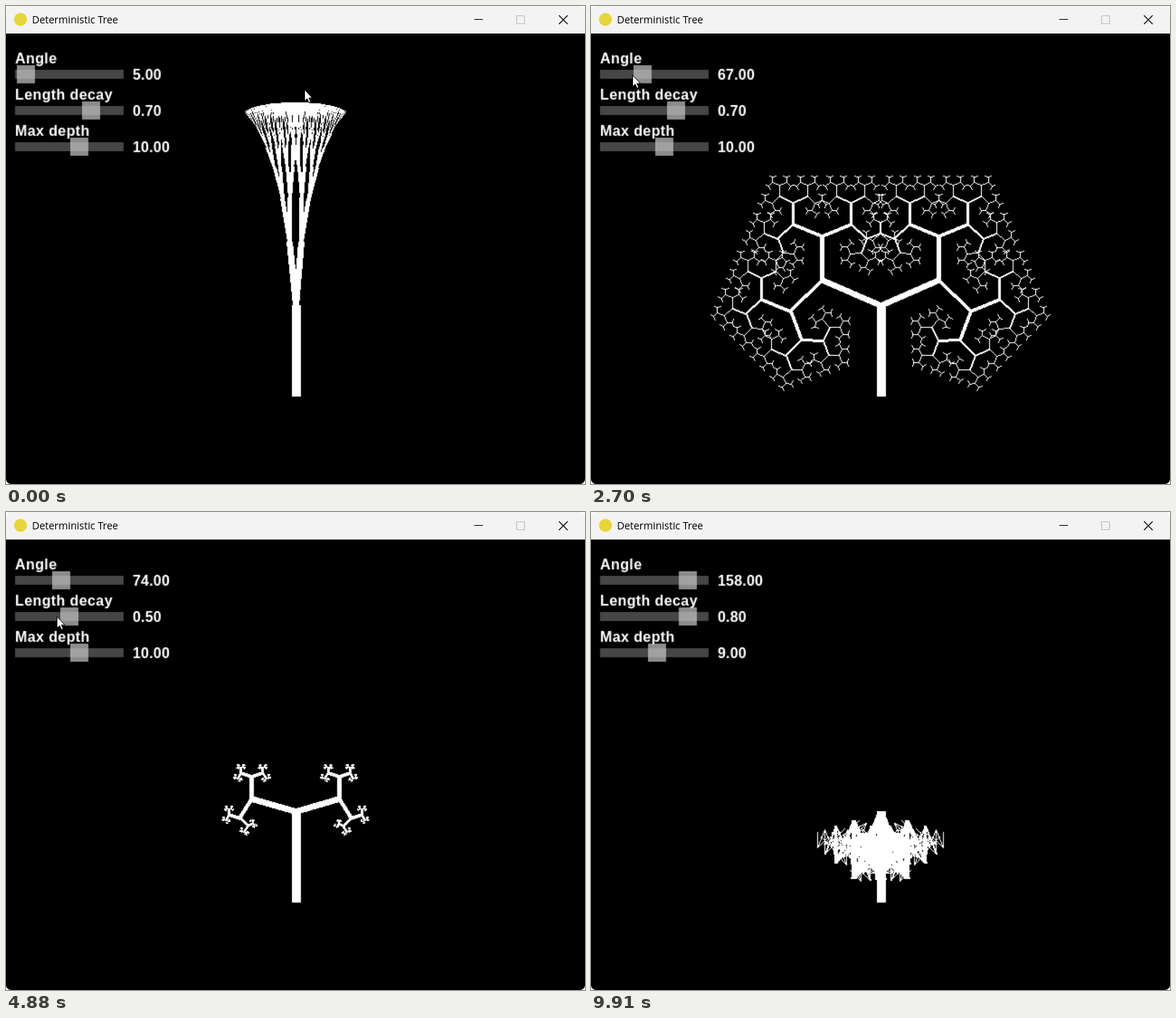
Recreate the animation shown at these times as an HTML page with a canvas. Size 800 px wide and 660 px high, loop 10 s.

```html
<!DOCTYPE html>
<html lang="en">
<head>
<meta charset="utf-8">
<title>Deterministic Tree</title>
<style>
  html, body { margin: 0; width: 800px; height: 660px; overflow: hidden; background: #fff; }
  canvas { display: block; }
</style>
</head>
<body>
<canvas id="stage" width="800" height="660"></canvas>
<script>
const LOOP = 10000, BAR = 38, SCALE = 1.25, W = 640, H = 498;
const ctx = document.getElementById('stage').getContext('2d');

// The game surface is small and shown enlarged.
const game = document.createElement('canvas');
game.width = W;
game.height = H;
const g = game.getContext('2d', { willReadFrequently: true });
const image = g.createImageData(W, H);
const pixels = new Uint32Array(image.data.buffer);

const angle = { label: 'Angle', row: 0, min: 0, max: 180, step: 1, initial: 5 };
const decay = { label: 'Length decay', row: 1, min: .1, max: .9, step: .1, initial: .7 };
const depth = { label: 'Max depth', row: 2, min: 2, max: 15, step: 1, initial: 10 };
const sliders = [angle, decay, depth];

// The hand's stops: [time, slider, value]. Between two stops on one slider
// it drags the knob, otherwise it glides across without touching anything.
const stops = [
  [1580, angle, 36], [2030, angle, 47], [2620, angle, 75], [3180, angle, 23], [3450, angle, 0], [3700, angle, 74],
  [3950, decay, .7], [4200, decay, .9], [4400, decay, .9], [5000, decay, .4],
  [5500, depth, 10], [5850, depth, 14], [6240, depth, 11], [6950, depth, 2],
  [7440, decay, .4], [7680, decay, .8],
  [7880, angle, 74], [8120, angle, 135], [8330, angle, 158], [8640, angle, 158],
  [8850, depth, 2], [9180, depth, 8], [9500, depth, 9], [9760, depth, 9],
];
const ENTRY = [412, 115], EXIT = [178, 20], EXIT_TIME = 120, CURSOR_LEAD = 40;

const mix = (a, b, u) => a + (b - a) * u;
const progress = (t, from, to) => Math.min(1, Math.max(0, (t - from) / (to - from)));
const ease = u => u * u * (3 - 2 * u);
const glide = (a, b, u) => a.map((v, i) => mix(v, b[i], ease(u)));
const fraction = (slider, value) => (value - slider.min) / (slider.max - slider.min);
const handAt = ([, slider, value]) =>
  [(10 + 100 * fraction(slider, value)) * SCALE, 95 + 49 * slider.row];

function valuesAt(t) {
  const values = sliders.map(s => s.initial);
  stops.forEach(([time, slider, value], i) => {
    if (t < time) return;
    const next = stops[i + 1];
    values[slider.row] = next && next[1] === slider
      ? mix(value, next[2], progress(t, time, next[0])) : value;
  });
  return values.map((v, i) => {
    const perUnit = Math.round(1 / sliders[i].step);
    return Math.round(v * perUnit) / perUnit;
  });
}

function cursorAt(t) {
  const next = stops.findIndex(s => s[0] > t);
  if (next === 0) {
    const [x, y] = glide(ENTRY, handAt(stops[0]), progress(t, 30, 700));
    const wiggle = Math.sin(Math.PI * progress(t, 910, 1300));
    return [x + 24 * wiggle, y - 16 * wiggle];
  }
  const last = stops[stops.length - 1];
  if (next < 0) return glide(handAt(last), EXIT, progress(t, last[0], last[0] + EXIT_TIME));
  const a = stops[next - 1], b = stops[next], u = progress(t, a[0], b[0]);
  const from = handAt(a), to = handAt(b);
  return a[1] === b[1] ? from.map((v, i) => mix(v, to[i], u)) : glide(from, to, u);
}

// Bresenham line, thickened along its minor axis.
function line(x, y, x2, y2, width) {
  const dx = Math.abs(x2 - x), dy = Math.abs(y2 - y);
  const sx = x < x2 ? 1 : -1, sy = y < y2 ? 1 : -1;
  const steep = dx <= dy, half = width >> 1;
  const from = width > 1 ? 1 - width % 2 - half : 0;
  let err = Math.trunc((dx > dy ? dx : -dy) / 2);
  for (let n = Math.max(dx, dy); n >= 0; n--) {
    for (let k = from; k <= half; k++) {
      const px = steep ? x + k : x, py = steep ? y : y + k;
      if (px >= 0 && px < W && py >= 0 && py < H) pixels[py * W + px] = 0xffffffff;
    }
    const e = err;
    if (e > -dx) { err -= dy; x += sx; }
    if (e < dy) { err += dx; y += sy; }
  }
}

function drawTree(turn, shrink, levels) {
  function branch(x, y, heading, length, width, level) {
    if (level === levels) return;
    const x2 = x + length * Math.sin(heading), y2 = y - length * Math.cos(heading);
    line(Math.trunc(x), Math.trunc(y), Math.trunc(x2), Math.trunc(y2), width);
    const thinner = Math.max(1, Math.round(width * .7));
    for (const side of [-turn, turn]) {
      branch(x2, y2, heading + side, length * shrink, thinner, level + 1);
    }
  }
  branch(320, 400, 0, 100, 10, 0);
}

function drawSlider(slider, value) {
  const y = 40 + 40 * slider.row;
  g.fillStyle = '#fff';
  g.font = 'bold 16px "Liberation Sans", sans-serif';
  g.letterSpacing = '0.4px';
  g.fillText(slider.label, 10, y - 7);
  g.letterSpacing = '0.2px';
  g.fillText(value.toFixed(2), 140, y + 11);
  g.fillStyle = 'rgba(100,100,100,.7)';
  g.fillRect(10, y, 120, 10);
  g.fillStyle = 'rgba(200,200,200,.7)';
  g.fillRect(10 + Math.floor(fraction(slider, value) * 100), y - 5, 20, 20);
}

let shown = '';
function drawGame(values) {
  if (values.join() === shown) return;
  shown = values.join();
  const [degrees, shrink, levels] = values;
  pixels.fill(0xff000000);
  drawTree(degrees * Math.PI / 180, shrink, levels);
  g.putImageData(image, 0, 0);
  sliders.forEach((s, i) => drawSlider(s, values[i]));
}

function stroke(color, path) {
  ctx.strokeStyle = color;
  ctx.lineWidth = 1.2;
  ctx.stroke(new Path2D(path));
}

function drawTitleBar() {
  ctx.fillStyle = '#f3f3f3';
  ctx.fillRect(0, 0, 800, BAR);
  ctx.fillStyle = '#e6d63c';
  ctx.beginPath();
  ctx.arc(20, 18.5, 9, 0, 2 * Math.PI);
  ctx.fill();
  ctx.fillStyle = '#000';
  ctx.font = '14px "Open Sans", sans-serif';
  ctx.fillText('Deterministic Tree', 36, 24);
  stroke('#000', 'M647 18.5h12M764 13l12 12m0-12l-12 12');
  stroke('#bdbdbd', 'M706.5 13.5h9q1 0 1 1v9q0 1-1 1h-9q-1 0-1-1v-9q0-1 1-1z');
}

const ARROW = new Path2D('M.5.5V16.3L4 13 6.6 18.5 9 17.4 6.5 12H11.3z');
function drawCursor(x, y) {
  ctx.save();
  ctx.translate(Math.round(x), Math.round(y));
  ctx.fillStyle = '#fff';
  ctx.strokeStyle = '#000';
  ctx.lineWidth = 1;
  ctx.fill(ARROW);
  ctx.stroke(ARROW);
  ctx.restore();
}

function render(t) {
  drawGame(valuesAt(t));
  ctx.fillStyle = '#fff';
  ctx.fillRect(0, 0, 800, 660);
  ctx.save();
  ctx.beginPath();
  ctx.roundRect(0, 0, 800, 660, 7);
  ctx.clip();
  ctx.drawImage(game, 0, BAR, W * SCALE, H * SCALE);
  drawTitleBar();
  ctx.restore();
  const leaving = stops[stops.length - 1][0];
  if (t < leaving + EXIT_TIME) drawCursor(...cursorAt(t + CURSOR_LEAD));
}

const start = performance.now();
function tick() {
  render((performance.now() - start) % LOOP);
  requestAnimationFrame(tick);
}
tick();
</script>
</body>
</html>
```
